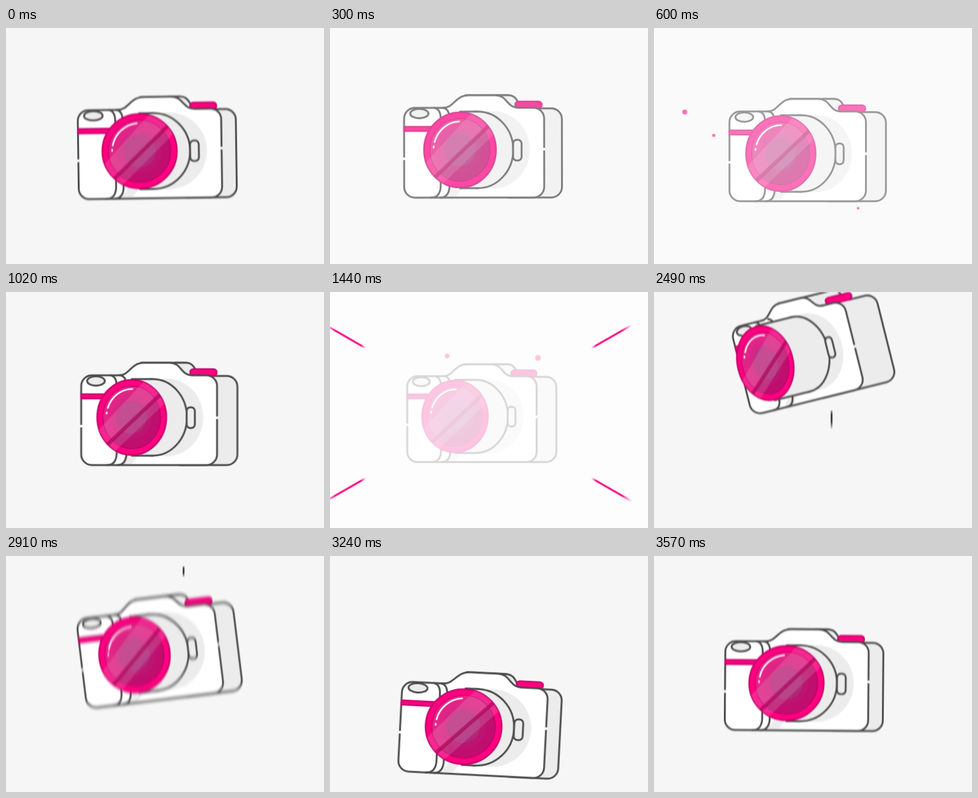
These frames come from a looping animation (505x376 px, 3.6 s). An HTML page without scripts:

```html
<!DOCTYPE html>
<html lang="en">
<head>
<meta charset="utf-8">
<title>Camera</title>
<style>
/* --turn: 0 = facing the viewer, 1 = turned far to the side */
@property --turn { syntax: "<number>"; inherits: true; initial-value: 0; }

html, body { margin: 0; width: 100%; height: 100%; overflow: hidden; background: #f6f6f6; }
svg { display: block; width: 505px; height: 376px; }

svg * { vector-effect: non-scaling-stroke; }
.ink { stroke: #4a4a4a; stroke-width: 2.9; stroke-linecap: round; fill: none; }
.white { fill: #fff; }
.gray { fill: #ececec; }
.pink { fill: #ff0080; stroke: #cc006c; stroke-width: 2.6; }
.gap { stroke: #fff; stroke-width: 4.4; }
.shine { stroke: #fff; stroke-width: 2.5; stroke-linecap: round; fill: none; }

.cam, .dot, .flash, .ray, .streak { animation: 3.6s linear infinite; }
.cam { animation-name: pose; }
.flash { animation-name: flash; fill: #fff; opacity: 0; }
.ray { animation-name: ray; stroke: url(#fade); stroke-width: 3; opacity: 0; }
.streak { animation-name: streak; stroke: url(#trail); stroke-width: 2.8; opacity: 0; }
.dot { fill: #ff0080; opacity: 0; animation-name: fly1; }
.second { animation-name: fly2; }
.late { animation-delay: .15s; }

/* Each layer slides and narrows with the turn */
.center { transform: translate(calc((-28 - 97 * var(--turn)) * 1px), -5px); }
.box    { x: calc((-98.5 + 112.5 * var(--turn)) * 1px); width: calc((230 - 88 * var(--turn)) * 1px); }
.front  { transform: translateX(calc((-98.5 + 112.5 * var(--turn)) * 1px)) scaleX(calc(1 - .383 * var(--turn))); }
.side   { width: calc((95 + 79 * var(--turn)) * 1px); }
.back   { transform: translateX(calc((66 + 126 * var(--turn)) * 1px)) scaleX(calc(1 - .45 * var(--turn))); }
.roof   { transform: translateX(calc((2 + 78 * var(--turn)) * 1px)) scaleX(calc(1 + .77 * var(--turn))); }
.button { transform: translateX(calc((103 + 67 * var(--turn)) * 1px)); }
.mount  { transform: translateX(calc((22 + 69 * var(--turn)) * 1px)) scaleX(calc(1 - .47 * var(--turn))); }
.tube   { transform: scaleX(calc(1 + 3.13 * var(--turn))); }
.lug    { transform: translateX(calc((88 + 35 * var(--turn)) * 1px)) scaleX(calc(1 - .42 * var(--turn))); }
.lens   { transform: scaleX(calc(1 - .51 * var(--turn))); }
.glare  { transform: translateY(calc(18px * var(--turn))) rotate(calc(18deg * var(--turn))); }
.arc    { transform: rotate(calc(40deg * var(--turn))); }
.notch  { transform: translateY(calc(22px * var(--turn))); }
.rib    { transform: translateX(calc(28px * var(--turn))); }

@keyframes pose {
  0%     { transform: translate(240px, 201px) rotate(-.8deg) scale(.99); --turn: 0; }
  2.5%   { transform: translate(240px, 188px) rotate(-1.4deg) scale(.99); --turn: .01; animation-timing-function: ease-out; }
  5%     { transform: translate(241px, 184px) rotate(-1.4deg) scale(1); --turn: .03; animation-timing-function: ease-in-out; }
  9%     { transform: translate(243px, 200px) rotate(0deg) scale(1); --turn: .09; }
  11.5%  { transform: translate(243px, 203px) rotate(0deg) scale(.95); --turn: .12; animation-timing-function: ease-in-out; }
  16%    { transform: translate(244px, 205px) rotate(0deg) scale(1); --turn: .15; }
  36.5%  { transform: translate(243px, 204.5px) rotate(0deg) scale(1); --turn: .17; }
  39%    { transform: translate(241px, 203px) rotate(0deg) scale(.945); --turn: .17; }
  40%    { transform: translate(241px, 203px) rotate(0deg) scale(.955); --turn: .17; animation-timing-function: ease-out; }
  44%    { transform: translate(242px, 204px) rotate(0deg) scale(1); --turn: .17; }
  45.6%  { transform: translate(242px, 204px) rotate(0deg) scale(1); --turn: .17; animation-timing-function: cubic-bezier(.45, 0, .3, 1); }
  54.2%  { transform: translate(242px, 289px) rotate(39deg) scale(1); --turn: 1; }
  61%    { transform: translate(242px, 291px) rotate(39.5deg) scale(1); --turn: 1; animation-timing-function: cubic-bezier(.35, 0, .55, .9); }
  69.17% { transform: translate(254px, 99.5px) rotate(-14deg) scale(1); --turn: .52; animation-timing-function: ease-out; }
  73.9%  { transform: translate(252px, 74px) rotate(-13deg) scale(1); --turn: .38; animation-timing-function: cubic-bezier(.33, 0, .67, .33); }
  80.83% { transform: translate(244px, 157px) rotate(-7deg) scale(1); --turn: .12; }
  84.7%  { transform: translate(240px, 255px) rotate(1deg) scale(1); --turn: 0; animation-timing-function: ease-out; }
  89%    { transform: translate(238px, 280px) rotate(3deg) scale(1); --turn: -.02; animation-timing-function: cubic-bezier(.3, 0, .8, .8); }
  99.17% { transform: translate(238px, 208px) rotate(.5deg) scale(.99); --turn: 0; }
  100%   { transform: translate(240px, 201px) rotate(-.8deg) scale(.99); --turn: 0; }
}
@keyframes flash {
  0%, 8%, 22.6%, 35.5%, 50.4%, 100% { opacity: 0; }
  9.3%, 37% { opacity: 1; }
}
@keyframes ray {
  0%, 9.2%   { opacity: 0; transform: translateX(-90px); }
  9.3%       { opacity: 1; transform: translateX(-90px); }
  14%, 36.9% { opacity: 0; transform: translateX(90px); }
  36.95%     { opacity: 0; transform: translateX(-90px); }
  37%        { opacity: 1; transform: translateX(-90px); }
  40%        { opacity: 1; transform: translateX(0); }
  42%, 100%  { opacity: 0; transform: translateX(70px); }
}
@keyframes fly1 {
  0%, 9.2% { opacity: 0; transform: translate(0, 0); }
  9.3%     { opacity: 1; transform: translate(calc(var(--x) * .3), calc(var(--y) * .3)) scale(1.4); animation-timing-function: ease-out; }
  16.67%   { opacity: 1; transform: translate(var(--x), var(--y)); animation-timing-function: ease-out; }
  26%      { opacity: 1; transform: translate(calc(var(--x) * 1.28), calc(var(--y) * 1.28)) scale(0); }
  26.1%, 100% { opacity: 0; transform: translate(0, 0); }
}
@keyframes fly2 {
  0%, 36.8% { opacity: 0; transform: translate(0, 0); }
  37%    { opacity: 1; transform: translate(calc(var(--x) * .4), calc(var(--y) * .4)); }
  40%    { opacity: 1; transform: translate(var(--x), var(--y)); animation-timing-function: ease-out; }
  51%    { opacity: 1; transform: translate(calc(var(--x) * 1.25), calc(var(--y) * 1.25)) scale(0); }
  51.1%, 100% { opacity: 0; transform: translate(0, 0); }
}
@keyframes streak {
  0%, 67%   { opacity: 0; transform: translateY(240px); }
  67.5%     { opacity: 1; transform: translateY(232px); }
  69.17%    { opacity: 1; transform: translateY(203px); }
  80.83%    { opacity: 1; transform: translateY(25px) scaleY(.6); }
  83%, 100% { opacity: 0; transform: translateY(-10px) scaleY(.3); }
}
</style>
</head>
<body>
<svg viewBox="0 0 505 376" aria-label="Camera taking two pictures">
  <defs>
    <linearGradient id="fade" gradientUnits="userSpaceOnUse" x1="206" x2="280" y1="0" y2="0">
      <stop offset="0" stop-color="#ff0080" stop-opacity="0"/>
      <stop offset=".12" stop-color="#ff0080"/>
      <stop offset=".75" stop-color="#ff0080"/>
      <stop offset="1" stop-color="#ff0080" stop-opacity="0"/>
    </linearGradient>
    <linearGradient id="trail" gradientUnits="userSpaceOnUse" x1="0" x2="0" y1="-15" y2="16">
      <stop offset="0" stop-color="#333" stop-opacity=".3"/>
      <stop offset=".25" stop-color="#333"/>
      <stop offset=".6" stop-color="#333"/>
      <stop offset="1" stop-color="#333" stop-opacity=".1"/>
    </linearGradient>
    <clipPath id="glass"><circle r="50"/></clipPath>
    <clipPath id="rim"><circle r="60"/></clipPath>
    <filter id="speed" filterUnits="userSpaceOnUse" x="0" y="0" width="505" height="376" color-interpolation-filters="sRGB">
      <feGaussianBlur stdDeviation="0 1">
        <animate attributeName="stdDeviation" dur="3.6s" repeatCount="indefinite"
          keyTimes="0;.05;.46;.5;.54;.61;.65;.692;.739;.808;.847;.89;.95;1"
          values="0 1;0 0;0 0;0 1.5;0 0;0 0;0 3;0 1;0 0;0 2.4;0 2.4;0 0;0 1;0 1"/>
      </feGaussianBlur>
    </filter>
  </defs>

  <rect width="505" height="376" fill="#f6f6f6"/>

  <g transform="translate(240 200)">
    <circle class="dot" r="4" style="--x:-191px;--y:-66px"/>
    <circle class="dot" r="2.6" style="--x:-145px;--y:-29px"/>
    <circle class="dot" r="2.1" style="--x:84px;--y:87px"/>
    <circle class="dot second" r="3.8" style="--x:-54px;--y:-98px"/>
    <circle class="dot second" r="4.6" style="--x:90px;--y:-95px"/>
    <circle class="dot second late" r="4" style="--x:204px;--y:15px"/>
  </g>

  <g filter="url(#speed)">
    <g class="cam"><g class="center">
      <rect class="ink gray side" x="60" y="-66" height="142" rx="17"/>
      <g class="roof">
        <path class="gray" d="M0-87H64V-40H0z"/>
        <path class="ink" d="M0-87H64"/>
      </g>
      <g class="back">
        <path class="gray" d="M-20-87H0C18-87 14-66 30-66V-60H-20z"/>
        <path class="ink" d="M-20-87H0C18-87 14-66 30-66"/>
      </g>
      <rect class="pink button" x="-21" y="-77" width="42" height="11" rx="5"/>

      <rect class="ink white box" y="-67" height="143" rx="17"/>
      <g class="front">
        <path class="white" d="M64-67C82-67 84-87 106-87H150C170-87 168-67 188-67V-60H64z"/>
        <path class="ink" d="M64-67C82-67 84-87 106-87H150C170-87 168-67 188-67"/>
        <circle class="gray" cx="144.5" r="62"/>
        <path class="gray" d="M68 74L86 50H104L86 74z"/>
        <path class="ink" d="M50-67Q60-65 60-50V58Q59 76 44 76"/>
        <path class="ink rib" d="M62-67Q72-65 72-50V60Q70 76 57 76"/>
        <rect class="pink" y="-37" width="59" height="7"/>
        <ellipse class="ink gray" cx="25" cy="-58" rx="15" ry="7.5"/>
        <path class="gap" d="M0 12v4"/>
        <path class="gap notch" d="M230-5v4"/>
      </g>

      <ellipse class="ink gray mount" rx="59" ry="61"/>
      <g class="tube">
        <path class="gray" d="M0-61H22V61H0z"/>
        <path class="ink" d="M0-61H22M0 61H22"/>
      </g>
      <rect class="ink gray lug" x="-7" y="-16" width="14" height="33" rx="6"/>

      <g class="lens">
        <circle class="pink" r="59.8"/>
        <circle r="50" fill="#e32487" stroke="#cc006f" stroke-width="1.5"/>
        <g clip-path="url(#glass)">
          <path class="glare" d="M-80 82L80-74V90H-80z" fill="#a8005c" opacity=".6"/>
        </g>
        <circle r="35" fill="#b03080" opacity=".2"/>
        <circle r="26" fill="#a83a80" opacity=".5"/>
        <g clip-path="url(#rim)">
          <g class="glare">
            <path d="M-75 40L28-72 76-48-36 62z" fill="#ddd" opacity=".17"/>
            <path d="M-55 57L60-54" stroke="#a80058" stroke-width="6" opacity=".65"/>
          </g>
        </g>
        <path class="shine arc" d="M-43-10A44.5 44.5 0 0 1-4-45M-44-3v2"/>
      </g>
    </g></g>
  </g>

  <g transform="translate(282)"><path class="streak" d="M0-14V15"/></g>
  <rect class="flash" width="505" height="376"/>

  <g transform="translate(236 193)">
    <g transform="rotate(30)"><path class="ray" d="M206 0H280"/></g>
    <g transform="rotate(150)"><path class="ray" d="M206 0H280"/></g>
    <g transform="rotate(210)"><path class="ray" d="M206 0H280"/></g>
    <g transform="rotate(330)"><path class="ray" d="M206 0H280"/></g>
  </g>
</svg>
</body>
</html>
```
